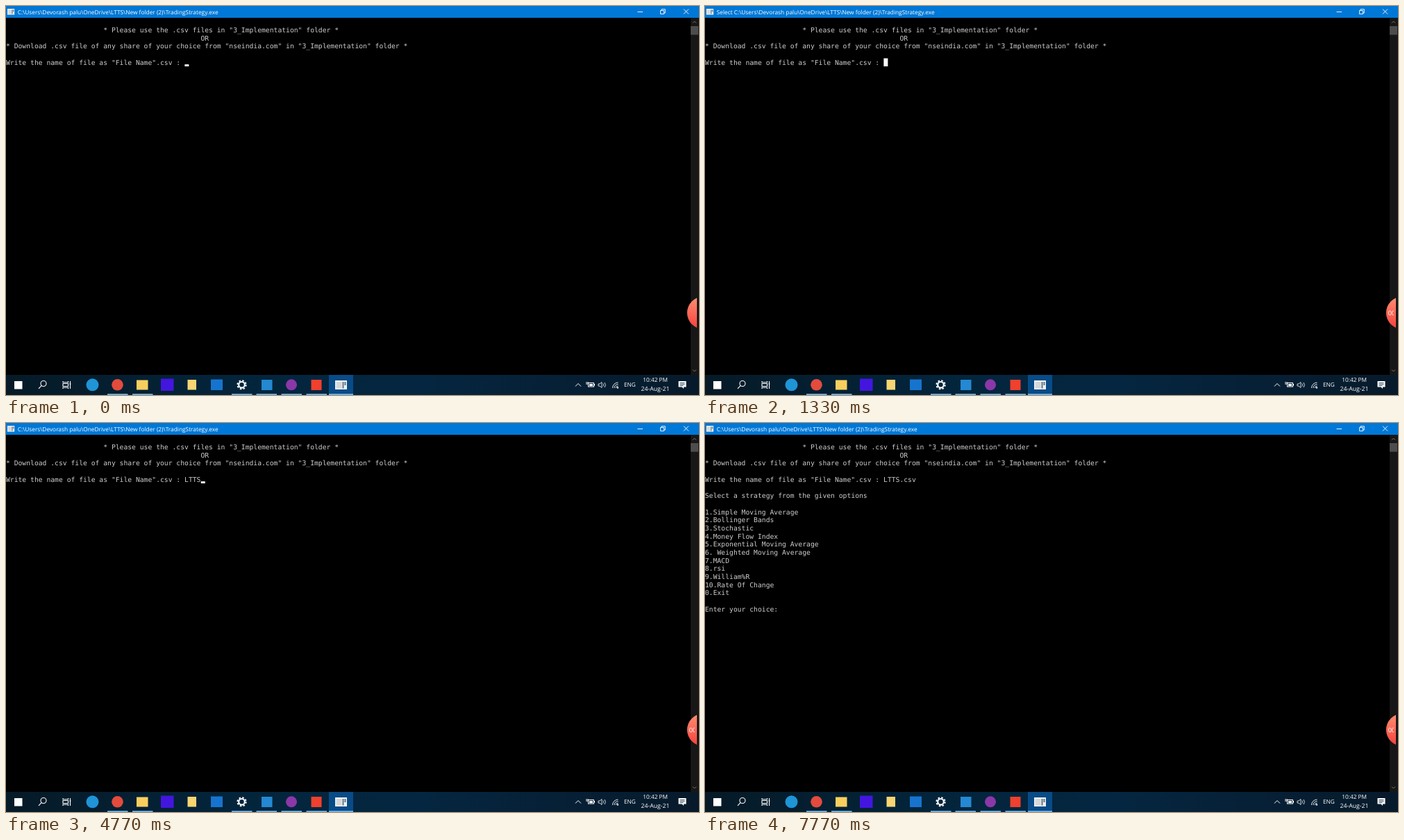
An HTML page for the animation above (8 s loop, 998 px wide and 561 px high).

```html
<!DOCTYPE html>
<html lang="en">
<head>
<meta charset="utf-8">
<title>Console session</title>
<style>
  html, body { margin: 0; width: 100%; height: 100%; overflow: hidden; background: #000; }
  svg { display: block; width: 998px; height: 561px; }
  text { text-rendering: geometricPrecision; white-space: pre; }
  .ui { font: 8.27px "Open Sans", "Noto Sans", sans-serif; fill: #fff; }
  .mono { font: 9.715px "DejaVu Sans Mono", monospace; fill: #ccc; }
  .line { fill: none; stroke: #fff; }
</style>
</head>
<body>
<svg viewBox="0 0 998 561">
  <defs>
    <linearGradient id="bar">
      <stop offset="0" stop-color="#061a27"/>
      <stop offset=".35" stop-color="#03253c"/>
      <stop offset=".6" stop-color="#052640"/>
      <stop offset="1" stop-color="#071a2b"/>
    </linearGradient>
    <linearGradient id="red" x1="0" y1="0" x2="0" y2="1">
      <stop offset="0" stop-color="#ff8f74"/>
      <stop offset="1" stop-color="#f5403a"/>
    </linearGradient>
    <clipPath id="edge"><rect x="970" y="410" width="25" height="70"/></clipPath>
    <clipPath id="digits"><rect x="970" y="410" width="22" height="70"/></clipPath>
    <g id="window">
      <rect width="17" height="13" fill="#f2f2f2"/>
      <rect x="1.5" y="2" width="8" height="9.5" fill="#d5d9dc"/>
      <path d="M10.5 2h2v9.500h-2zM13.500 2h2v5h-2z" fill="#5f7687"/>
    </g>
  </defs>
  <rect width="998" height="561"/>

  <!-- title bar -->
  <rect width="998" height="17" fill="#0078d7"/>
  <use href="#window" transform="translate(2 4) scale(.6 .66)"/>
  <text id="title" class="ui" x="16.7" y="11.5" style="font-size:8.34px"></text>
  <path class="line" stroke-width=".9" d="M909.5 8.5h7.5M942.5 6.5h5v5h-5zM944 6.5v-1.800h5.300v5.300h-1.800M976 4.500l7 7m0-7l-7 7"/>

  <!-- scroll bar -->
  <rect x="986" y="17" width="12" height="515" fill="#171717"/>
  <rect x="986" y="29" width="11" height="12.5" fill="#4d4d4d"/>
  <path class="line" style="stroke:#777" d="M989 24.5l2.500-2.500 2.500 2.500M989 524.500l2.500 2.500 2.500-2.500"/>

  <g id="console" class="mono"></g>
  <rect id="block" fill="#fff" width="6"/>

  <circle cx="1004.3" cy="442.5" r="23.4" fill="url(#red)" clip-path="url(#edge)"/>
  <g clip-path="url(#digits)">
    <text id="timer" class="ui" x="983.7" y="446.3" style="font-size:9px">00:00</text>
  </g>

  <!-- task bar -->
  <rect y="532" width="998" height="29" fill="url(#bar)"/>
  <rect x="465" y="532" width="35" height="29" fill="#084b87"/>
  <g id="running" fill="#76b9ed"></g>
  <rect x="12" y="541" width="11.5" height="11.5" fill="#fff"/>
  <g class="line" stroke-width="1.1">
    <circle cx="54" cy="544.5" r="4"/>
    <path d="M51.2 547.4l-4.2 4.4"/>
    <path d="M82 541v1.8h7.5V541M82 552v-1.8h7.5V552M82 544.5h7.5v4H82zM92.5 541v11M91.5 545h2"/>
    <circle cx="339.5" cy="546.3" r="4.3" stroke-width="2.2"/>
    <circle cx="339.5" cy="546.3" r="6.2" stroke-width="1.8" stroke-dasharray="2.5 2.37"/>
  </g>
  <g id="apps"></g>
  <use href="#window" x="474" y="540"/>

  <!-- tray -->
  <g class="line">
    <path d="M820 548.5l4-4 4 4"/>
    <rect x="838.5" y="543.5" width="8" height="5.5"/>
    <path d="M836 542v4m2-4v4"/>
    <path d="M853 545h2l3-2.5v8l-3-2.5h-2zM860 544.5q1.5 2 0 4M862 543q3 3.5 0 7" stroke-width=".8"/>
    <path d="M873.5 551a8 8 0 0 1 8-8M876 551a5.5 5.5 0 0 1 5.5-5.5M878.5 551a3 3 0 0 1 3-3" stroke-width=".9"/>
  </g>
  <path d="M840 545h5v3h-5zM847 545h1v2.5h-1zM880 549.5h2v2h-2z" fill="#fff"/>
  <text class="ui" x="890" y="549.3">ENG</text>
  <g class="ui" text-anchor="middle">
    <text x="935.2" y="542.4">10:42 PM</text>
    <text x="935" y="555" style="font-size:8.7px">24-Aug-21</text>
  </g>
  <path d="M968.5 541h11v8.5h-3.5v2.5l-2.5-2.5h-5z" fill="#fff"/>
  <path d="M970.5 543.5h7m-7 2h7m-7 2h5" stroke="#0a2032" stroke-width=".8"/>
</svg>

<script>
const LOOP = 8000, TOP = 17, ROW = 11.69, COL = 5.849;
const SELECT = [1130, 3530], TIMER = 1100, MENU = 6630;
const PATH = 'C:\\Users\\Devorash palu\\OneDrive\\LTTS\\New folder (2)\\TradingStrategy.exe';
const PROMPT = 'Write the name of file as "File Name".csv : ';
const ANSWER = 'LTTS.csv';
const KEYS = [4270, 4300, 4330, 4400, 5170, 5400, 5570, 5870];
const BLINKS = [60, 500, 900, 1370, 1630, 2200, 2670, 3070, 3500, 3930,
  4370, 4770, 5200, 5630, 6070, 6470, 7400];
const INTRO = ['', ' '.repeat(24) + '* Please use the .csv files in "3_Implementation" folder *',
  ' '.repeat(48) + 'OR',
  '* Download .csv file of any share of your choice from "nseindia.com" in "3_Implementation" folder *', ''];
const OPTIONS = ['', 'Select a strategy from the given options', '',
  '1.Simple Moving Average', '2.Bollinger Bands', '3.Stochastic', '4.Money Flow Index',
  '5.Exponential Moving Average', '6. Weighted Moving Average', '7.MACD', '8.rsi',
  '9.William%R', '10.Rate Of Change', '0.Exit', '', 'Enter your choice: '];

const $ = id => document.getElementById(id);
function add(parent, tag, attrs) {
  const el = document.createElementNS('http://www.w3.org/2000/svg', tag);
  for (const k in attrs) el.setAttribute(k, attrs[k]);
  return parent.appendChild(el);
}
const square = (x, y, width, height, fill) => add($('apps'), 'rect', { x, y, width, height, fill });
const disc = (cx, r, fill) => add($('apps'), 'circle', { cx, cy: 546.3, r, fill });

disc(124.5, 9, '#1f94d6');
disc(160.5, 8.3, '#e34b3d');
square(188, 539.5, 16.5, 14, '#f8cf5e');
square(223, 537.5, 18.5, 17.5, '#4316df');
square(261.5, 539, 12.5, 14.5, '#f8d573');
square(295, 538.5, 17, 15.5, '#1674cf');
square(368, 539, 15.5, 15, '#2489d2');
disc(411, 8, '#8b37a8');
square(439.5, 539, 15, 15, '#f0402e');
for (const x of [146, 182, 325, 360.5, 396.5, 432.5])
  add($('running'), 'rect', { x, y: 559.3, width: 29.5, height: 1.7 });
add($('running'), 'rect', { x: 465, y: 559.3, width: 35, height: 1.7 });

const rows = [...INTRO, PROMPT, ...OPTIONS].map((line, i) => {
  const el = add($('console'), 'text', { x: 0, y: TOP + i * ROW + 9.3 });
  el.textContent = line;
  return el;
});
const promptRow = INTRO.length;

function block(col, row, from, to) {
  const b = $('block'), y = TOP + row * ROW;
  b.setAttribute('x', col * COL);
  b.setAttribute('y', y + from);
  b.setAttribute('height', to - from);
}

function draw(t) {
  const selecting = t >= SELECT[0] && t < SELECT[1], menu = t >= MENU;
  const typed = KEYS.filter(k => t >= k).length;
  const on = BLINKS.filter(b => t >= b).length % 2 === 0;

  $('title').textContent = (selecting ? 'Select ' : '') + PATH;
  $('timer').style.display = t >= TIMER ? '' : 'none';
  rows[promptRow].textContent = PROMPT + ANSWER.slice(0, typed);
  rows.forEach((el, i) => el.style.display = i <= promptRow || menu ? '' : 'none');

  $('block').style.display = on || selecting ? '' : 'none';
  // a blinking caret cuts the foot off the selected cell
  if (selecting) block(PROMPT.length, promptRow, 0, on && t >= 1370 ? 8.6 : 11.6);
  else if (menu) block(19, rows.length - 1, 8.7, 11.6);
  else block(PROMPT.length + typed, promptRow, 8.7, 11.6);
}

const start = performance.now();
function tick() {
  draw((performance.now() - start) % LOOP);
  requestAnimationFrame(tick);
}
tick();
</script>
</body>
</html>
```
